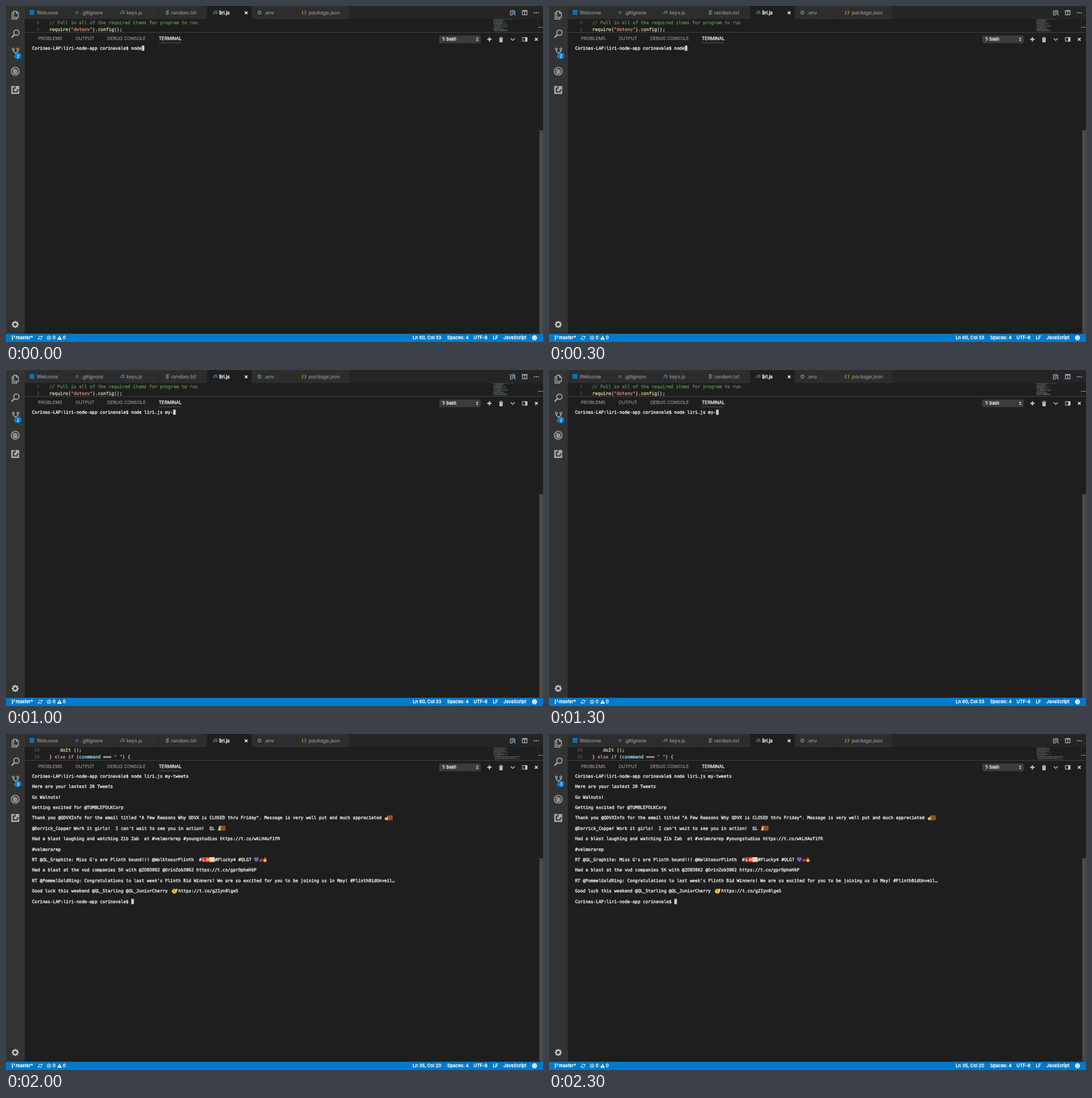
Recreate the animation shown at these times as an HTML page with a canvas. Size 947 px wide and 592 px high, loop 2500 ms.

```html
<!DOCTYPE html>
<html lang="en">
<head>
<meta charset="utf-8">
<title>Terminal session</title>
<style>
  html, body { margin: 0; width: 100%; height: 100%; overflow: hidden; background: #1e1e1e; }
  canvas { display: block; width: 947px; height: 592px; }
</style>
</head>
<body>
<canvas id="stage" width="947" height="592"></canvas>
<script>
const ctx = document.getElementById('stage').getContext('2d');
const TAU = Math.PI * 2;
const STEP = 500;
const COMMANDS = ['node', 'node liri.js', 'node liri.js my-', 'node liri.js my-tweets'];
const PROMPT = 'Corinas-LAP:liri-node-app corinavale$ ';

const TERM = { x: 46, y: 76.8, cell: 4.605, line: 18.4, font: '7.65px "DejaVu Sans Mono", monospace' };
const CODE = { x: 76.3, cell: 4.763, font: '7.91px "DejaVu Sans Mono", monospace' };
const STATUS_TOP = 577.5;
const LIGHT = 0.15, MEDIUM = 0.3, HEAVY = 0.42;
const ui = (size, style = '') => `${style} ${size}px Inter, sans-serif`;

// Each output line is a list of [column, text].
const OUTPUT = [
  [[0, 'Here are your lastest 20 Tweets']],
  [[0, 'Go Walnuts!']],
  [[0, 'Getting excited for @TUMBLEFOLKCorp']],
  [[0, 'Thank you @QDVXInfo for the email titled "A Few Reasons Why QDVX is CLOSED thru Friday". Message is very well put and much appreciated']],
  [[0, "@Dorrick_Copper Work it girls!  I can't wait to see you in action!  QL"]],
  [[0, 'Had a blast laughing and watching Zib Zab  at #velmorarep #youngstudios https://t.co/wkLHAuf1fR']],
  [[0, '#velmorarep']],
  [[0, "RT @QL_Graphite: Miss G's are Plinth bound!!! @WalktoourPlinth  #"], [70, '#Plucky4 #QLG7']],
  [[0, 'Had a blast at the vud companies 5K with @ZOB3862 @OrinZob3862 https://t.co/gprOpheHkP']],
  [[0, "RT @PommelGoldRing: Congratulations to last week's Plinth Bid Winners! We are so excited for you to be joining us in May! #PlinthBidUnveil…"]],
  [[0, 'Good luck this weekend @QL_Starling @QL_JuniorCherry'], [56, 'https://t.co/g2Iyn0lgeS']]
];

function rect(x, y, w, h, color) {
  ctx.fillStyle = color;
  ctx.fillRect(x, y, w, h);
}

// A thin outline gives the letters the weight of smoothed screen type.
function text(str, x, y, font, color, heft = LIGHT) {
  ctx.font = font;
  ctx.fillStyle = ctx.strokeStyle = color;
  ctx.lineWidth = heft;
  ctx.lineJoin = 'round';
  ctx.fillText(str, x, y);
  ctx.strokeText(str, x, y);
}

function disc(x, y, r, color) {
  ctx.fillStyle = color;
  ctx.beginPath();
  ctx.arc(x, y, r, 0, TAU);
  ctx.fill();
}

function ring(x, y, r, color, width = 1, from = 0, to = TAU) {
  ctx.strokeStyle = color;
  ctx.lineWidth = width;
  ctx.beginPath();
  ctx.arc(x, y, r, from, to);
  ctx.stroke();
}

function path(d, color, width = 1, dx = 0, dy = 0) {
  ctx.save();
  ctx.translate(dx, dy);
  ctx.lineJoin = 'miter';
  const shape = new Path2D(d);
  if (width) {
    ctx.strokeStyle = color;
    ctx.lineWidth = width;
    ctx.stroke(shape);
  } else {
    ctx.fillStyle = color;
    ctx.fill(shape);
  }
  ctx.restore();
}

function gear(x, y, r, color, teeth = 8) {
  ring(x, y, r * 0.62, color, r * 0.42);
  for (let i = 0; i < teeth; i++) {
    ctx.save();
    ctx.translate(x, y);
    ctx.rotate(i * TAU / teeth);
    rect(-r * 0.17, -r, r * 0.34, r * 0.4, color);
    ctx.restore();
  }
}

function activityBar(badge) {
  const gray = '#adadad', back = '#333333';
  rect(0, 0, 33, STATUS_TOP, back);

  path('M13.5 9.2h5l3.3 3.3v7.5h-8.3z M18.2 9.2v3.6h3.6', gray, 1.4);
  path('M13 12h-2.3v11h8.3v-2.5', gray, 1.4);

  ring(18.3, 47, 4.7, gray, 1.7);
  path('M14.8 50.5L9.8 55.6', gray, 2.3);

  path('M13 77v2.5l4 4v6 M21 77v2.5l-4 4', gray, 1.7);
  for (const [x, y] of [[13, 76], [21, 76], [17, 89]]) ring(x, y, 1.8, gray, 1.3);
  disc(21.2, 88, 6, '#007acc');
  text(badge, 19, 90.7, ui(7.4, '500'), '#ffffff');

  ring(16.3, 115, 7.1, gray, 1.4);
  disc(16.3, 115.6, 3.4, gray);
  path('M11 113h10.5 M10.5 116h11.5 M12 119.5h8.5 M14 110l2 2l2-2', gray, 0.9);
  path('M11.3 110L21.3 120', back, 2.4);
  path('M11.3 110L21.3 120', gray, 1.3);

  rect(9.3, 141, 14, 14, gray);
  rect(12, 143.6, 8.7, 8.8, back);
  rect(15.5, 141, 1.4, 3, back);
  rect(20.5, 147.3, 3, 1.4, back);
  rect(14.2, 145.8, 4.6, 4.6, gray);
  rect(17, 143, 3.8, 4.2, gray);

  gear(16.3, 561, 6.2, '#c0c0c0');
}

function tabBar() {
  rect(33, 0, 914, 23, '#252526');
  const edges = [33, 113, 192, 270, 355, 434, 513, 606];
  for (let i = 0; i < 7; i++) {
    rect(edges[i], 0, edges[i + 1] - edges[i] - 1, 23, i === 4 ? '#1e1e1e' : '#2d2d2d');
  }
  const dim = '#969696', blue = '#4a94b8';
  const label = (str, x, color = dim, style = '', heft = LIGHT) =>
    text(str, x, 14.5, ui(8.6, style), color, heft);
  const glyph = (str, x, color) => text(str, x, 14, ui(7, '600'), color);

  rect(41.5, 7, 8.5, 8.5, '#0873b8');
  label('Welcome', 54);
  disc(125.3, 11.5, 3, '#41535b');
  label('.gitignore', 133);
  glyph('JS', 201, blue);
  label('keys.js', 212.5);
  for (let i = 0; i < 4; i++) rect(282, 8 + i * 2.1, i % 2 ? 4 : 6, 0.9, '#a8b2b5');
  label('random.txt', 291.5);
  glyph('JS', 364.5, blue);
  label('liri.js', 376, '#ffffff', '', HEAVY);
  path('M421.2 9.7l4.6 4.6m0-4.6l-4.6 4.6', '#ffffff', 1.5);
  gear(447, 11.5, 3.8, '#5c7f8c');
  label('.env', 455.5);
  glyph('{ }', 521.5, '#b7b73b');
  label('package.json', 534, dim, 'italic');

  path('M892 8.5h-2.5v7.5h4 M892.5 7.5h3l2.3 2.3v2', '#c5c5c5', 1);
  ring(894.3, 11.8, 2.2, '#75beff', 1.1);
  path('M896 13.5l2.8 2.8', '#75beff', 1.3);
  path('M910.8 8.5h8v7h-8z M914.8 8v8', '#c5c5c5', 1.1);
  rect(910.3, 7.5, 9, 1.8, '#c5c5c5');
  for (const x of [932, 935.3, 938.6]) disc(x, 12, 1, '#c5c5c5');
}

function codeLine(number, baseline, indent, tokens) {
  ctx.textAlign = 'right';
  text(number, 59, baseline, CODE.font, '#5a5a5a');
  ctx.textAlign = 'left';
  let column = indent;
  for (const [str, color] of tokens) {
    text(str, CODE.x + column * CODE.cell, baseline, CODE.font, color, MEDIUM);
    column += str.length;
  }
}

function minimap(finished) {
  let seed = finished ? 71 : 23;
  const random = () => (seed = seed * 16807 % 2147483647) / 2147483647;
  const colors = finished
    ? ['#777777', '#5d7d8d', '#705c50', '#666666']
    : ['#477b96', '#547044', '#83705f', '#65828d'];
  random();
  ctx.globalAlpha = 0.85;
  for (let row = 0; row < 14; row++) {
    const wide = finished && row > 9;
    let x = 859 + (wide ? 3 : Math.floor(random() * 3));
    const end = wide ? 895 + random() * 18 : 872 + random() * 14;
    while (x < end) {
      const w = 1 + random() * 4;
      rect(x, 24 + row * 1.5, w, 0.9, colors[Math.floor(random() * 4)]);
      x += w + 0.7;
    }
  }
  ctx.globalAlpha = 1;
  if (!finished) rect(859, 23.5, 36, 0.6, '#4b6340');
}

function editor(finished) {
  const white = '#d4d4d4', yellow = '#dcdcaa', string = '#ce9178', pink = '#c586c0';
  if (finished) {
    codeLine('28', 31, 4, [['doIt', yellow], [' ();', white]]);
    codeLine('29', 42.8, 0, [['} ', white], ['else if', pink], [' (', white], ['conmmand', '#9cdcfe'],
      [' === ', white], ['" "', string], [') {', white]]);
  } else {
    codeLine('1', 31.7, 0, [['// Pull in all of the required items for program to run', '#608b4e']]);
    codeLine('2', 43.5, 0, [['require', yellow], ['(', white], ['"dotenv"', string], [').', white],
      ['config', yellow], ['();', white]]);
  }
  minimap(finished);
  rect(938, 23, 0.7, 23, '#363636');
  rect(938.5, 37, 8.5, 1, '#a0a0a0');
}

function panelHeader() {
  rect(33, 46, 914, 1, '#424242');
  const tabs = [['PROBLEMS', 56.5], ['OUTPUT', 122.5], ['DEBUG CONSOLE', 178.5], ['TERMINAL', 269.5]];
  tabs.forEach(([name, x], i) => {
    const active = i === 3;
    text(name, x, 60, ui(7.95), active ? '#e7e7e7' : '#999999', active ? HEAVY : LIGHT);
  });
  rect(269.5, 64.5, 39.5, 0.7, '#707070');

  ctx.fillStyle = '#3c3c3c';
  ctx.beginPath();
  ctx.roundRect(764, 52, 73, 13.5, 2);
  ctx.fill();
  text('1: bash', 769.5, 61.3, ui(7.4, '500'), '#f0f0f0', MEDIUM);
  path('M829 58l2-2.8l2 2.8z M829 59.5l2 2.8l2-2.8z', '#dddddd', 0);

  const icon = '#cfcfcf';
  path('M848.7 58.8h7.6 M852.5 55v7.6', icon, 2);
  path('M870.5 57h5l-.5 6.5h-4z', '#a8a8a8', 0);
  path('M869.2 56.3h7.6 M871.5 54.8h3 M870.6 57v6.5h4.8v-6.5 M872.2 58v4.5 M873.8 58v4.5', icon, 0.9);
  path('M890 57l3.6 3.6l3.6-3.6', icon, 1.2);
  path('M910.8 55.5h8v6.5h-8z', icon, 1);
  rect(915.6, 55, 3.7, 7.5, icon);
  path('M932.8 56.4l4.8 4.8m0-4.8l-4.8 4.8', '#e5e5e5', 1.5);
}

function statusBar(finished) {
  const white = '#ffffff', blue = '#007acc';
  const label = (str, x) => text(str, x, 587.3, ui(7.95, '500'), white, MEDIUM);
  rect(0, STATUS_TOP, 947, 592 - STATUS_TOP, blue);
  path('M11 582v5 M14.8 582.5q0 2.5-3.6 3', white, 1);
  for (const [x, y] of [[11, 581.5], [14.8, 581.8], [11, 587.5]]) disc(x, y, 1.1, white);
  label('master*', 17.3);
  ring(60.3, 584.5, 2.8, white, 1, 3.4, 5.9);
  ring(60.3, 584.5, 2.8, white, 1, 0.25, 2.8);
  path('M61.3 583.8h3v-2.8z M59.3 585.2h-3v2.8z', white, 0);
  ring(75.8, 584.6, 3.2, white, 1);
  path('M74.3 583.1l3 3m0-3l-3 3', white, 0.9);
  label('0', 82.3);
  path('M94.5 580.7l4 7.4h-8z', white, 0);
  path('M94.5 583v2.5 M94.5 586.3v.9', blue, 0.9);
  label('0', 100.3);
  label(finished ? 'Ln 35, Col 20' : 'Ln 60, Col 33', 717.3);
  label('Spaces: 4', 778);
  label('UTF-8', 824.5);
  label('LF', 858.5);
  label('JavaScript', 877.3);
  disc(932, 584.6, 4.3, white);
  disc(930.4, 583.3, 0.75, blue);
  disc(933.6, 583.3, 0.75, blue);
  ring(932, 584.9, 2.2, blue, 0.9, 0.15, Math.PI - 0.15);
}

function swatch(x, y) {
  rect(x, y, 8.5, 8.5, '#83522f');
  for (let i = 1; i < 4; i++) {
    rect(x + i * 2.1, y, 0.5, 8.5, '#a66e42');
    rect(x, y + i * 2.1, 8.5, 0.5, '#6b4328');
  }
}

function emoji() {
  path('M0 4h3l2.5-3.5l1.2 1l-.7 2.5h2v4.5h-5l-3-.7z', '#f6bd35', 0, 668, 143.3);
  swatch(673.5, 143.3);
  path('M2.5 0l3 .3v3l3 2v3h-8.3z', '#f5c33c', 0, 373.5, 161.8);
  swatch(378.5, 161.8);

  rect(345.3, 217, 13.5, 8.5, '#dc251c');
  text('L', 347, 224, ui(6.5, '700'), '#ffffff');
  text('A', 352, 224, ui(6.5, '700'), '#ffdf91');
  rect(358.5, 217, 9.5, 8.5, '#f1d2af');
  path('M355 217l5 4l-5 4.5l1-4.5z', '#f4a51d', 0);

  path('M4.5 8.5C-4 2 2-2 4.5 1.5C7-2 13 2 4.5 8.5z', '#8f4fc7', 0, 437, 217);
  path('M0 1l3-1l3 3v5l-4 .5z', '#201b19', 0, 446, 217);
  path('M0 7l4-5l3 2l-3 4.5z', '#8a5a36', 0, 446, 217);
  path('M3.8 0q.8 2.5 2.7 3.6q2.5 5-2.7 5.2q-5.5-.8-2.8-5.3l1 1.2q.4-2.5 1.8-4.7z', '#ef7828', 0, 452.7, 216.8);
  path('M3.8 4q3.8 4.5 0 4.5q-3.5-.5 0-4.5z', '#ffd153', 0, 452.7, 216.8);

  disc(297, 277, 4.3, '#f3b52e');
  path('M292 278l3-5l2 3l4-4l1.5 3l-3 5z', '#ffd045', 0);
  path('M294 274.5l6 4.5 M298 273l-2 6', '#80551d', 0.8);
}

function terminal(frame) {
  const print = (str, column, row) =>
    text(str, TERM.x + column * TERM.cell, TERM.y + row * TERM.line, TERM.font, '#e8e8e8', HEAVY);
  const finished = frame === COMMANDS.length;
  const command = COMMANDS[Math.min(frame, COMMANDS.length - 1)];
  print(PROMPT + command, 0, 0);

  let row = 0;
  let column = PROMPT.length + command.length;
  if (finished) {
    OUTPUT.forEach((parts, i) => parts.forEach(([at, str]) => print(str, at, i + 1)));
    emoji();
    row = OUTPUT.length + 1;
    column = PROMPT.length;
    print(PROMPT, 0, row);
  }
  rect(TERM.x + column * TERM.cell, 69.7 + row * TERM.line, TERM.cell, 9.2, '#cccccc');
  rect(940.5, 219, 6.5, 358, '#4b4b4b');
}

function draw(now) {
  const frame = Math.floor(now / STEP) % (COMMANDS.length + 1);
  const finished = frame === COMMANDS.length;
  rect(0, 0, 947, 592, '#1e1e1e');
  tabBar();
  editor(finished);
  panelHeader();
  terminal(frame);
  activityBar(finished ? '3' : '2');
  statusBar(finished);
}

const start = performance.now();
function tick() {
  draw(performance.now() - start);
  requestAnimationFrame(tick);
}
tick();
</script>
</body>
</html>
```
